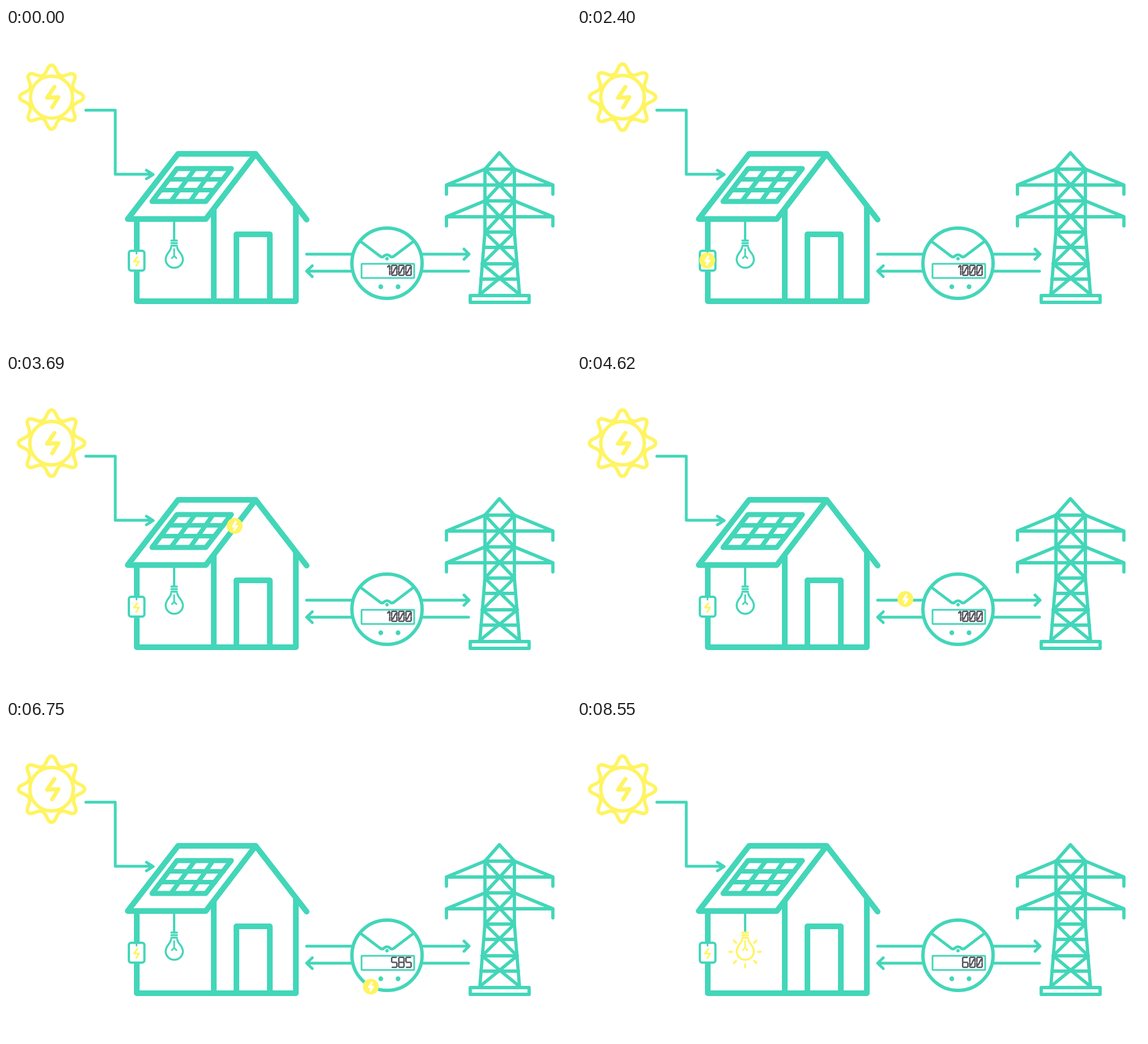
Recreate the animation shown at these times as an HTML page. Size 998 by 561 pixels, loop 9000 ms.

```html
<!DOCTYPE html>
<html lang="en">
<head>
<meta charset="utf-8">
<title>Solar power and net metering</title>
<style>
  html, body { margin: 0; width: 100%; height: 100%; overflow: hidden; background: #fff; }
  svg { display: block; width: 100%; height: 100%; }
  svg { --teal: #43d6b9; --sun: #fff462; }
  g, path, circle, rect { stroke-linecap: round; stroke-linejoin: round; }
  .line { fill: none; stroke: var(--teal); }
  .dot { fill: var(--teal); stroke: none; }
  .yellow { fill: none; stroke: var(--sun); }
  .lit { stroke: var(--sun); }
  .rays { visibility: hidden; }
  .lit .rays { visibility: visible; }
</style>
</head>
<body>
<svg viewBox="0 0 998 561">
  <g class="yellow" transform="translate(80.5 122)">
    <g id="sun" stroke-width="6">
      <circle r="37.5"/>
    </g>
    <path d="M5-18L-8 1L12 0L1 18" stroke-width="7"/>
  </g>

  <g class="line" stroke-width="5">
    <path d="M141 145H193V258H258M248 251L260 258.5L248 266"/>
    <path d="M531 399H816M809 390L818 399L809 408"/>
    <path d="M817 429H533M541 419.500L531 429L541 438.500"/>
  </g>

  <g class="line" stroke-width="10">
    <path d="M304 222H441L353 337H215ZM441 222L531 338"/>
    <path d="M231 338V482H512V316M367 320V482M407 482V364H466V482"/>
  </g>

  <g id="panel" class="line" stroke-width="9">
    <path d="M302 248H398L353 306H258Z"/>
    <path d="M288 267H384M273 286H369M334 248L291 306M366 248L325 306" stroke-width="8"/>
  </g>

  <path class="line" d="M297 342V374" stroke-width="4"/>
  <g id="bulb" class="line" stroke-width="3.500">
    <path d="M292 375H302M292 379.500H302M292 384H302"/>
    <path d="M291.500 387C291 395 282 397 282 409A15.300 15.300 0 0 0 312.500 409C312.500 397 303 395 302.500 387"/>
    <path d="M297 390V402L293 406M297 402L301 406" stroke-width="3"/>
    <path class="rays" d="M320 409H325M274 409H269M297 431V436M313 425L317 429M281 425L277 429M313 393L317 389M281 393L277 389"/>
  </g>

  <g id="battery" class="line" stroke-width="4">
    <rect x="217" y="393" width="27.500" height="35" rx="4" fill="#fff"/>
    <path d="M230.500 394V398" stroke-width="3"/>
    <path class="yellow" d="M232 404L226 412H235L230 420" stroke-width="3"/>
  </g>

  <g class="line" stroke-width="6">
    <circle cx="673" cy="415" r="62" fill="#fff"/>
    <path d="M627 377L660 402Q665 406 668 402Q673 398 678 402Q681 406 686 402L719 377" stroke-width="5"/>
    <rect x="628" y="416" width="93" height="25" rx="1" stroke-width="3"/>
    <circle class="dot" cx="673" cy="407" r="3"/>
    <circle class="dot" cx="662" cy="456.500" r="4.200"/>
    <circle class="dot" cx="692.500" cy="456.500" r="4.200"/>
  </g>
  <path id="digits" fill="none" stroke="#55535c" stroke-width="2.600"/>

  <g id="tower" class="line" stroke-width="5.800">
    <path d="M846 249L871.500 220L898 249"/>
    <path d="M846 249V360L837 470M898 249V360L907 470"/>
    <path d="M846 249H898M846 305H898M846 360H898M844 387H900M841 416H903M839 443H905"/>
    <path d="M846 249L778 277V293M778 277H966M898 249L966 277V293"/>
    <path d="M846 305L778 333V349M778 333H966M898 305L966 333V349"/>
    <path d="M846 249L898 305L846 360L903 416L837 470M898 249L846 305L898 360L841 416L907 470"/>
    <rect x="820" y="472" width="104" height="12"/>
  </g>

  <g id="ball">
    <circle r="14" fill="#fff462"/>
    <path d="M2-7L-3 1L4 0L-1 7" fill="none" stroke="#fff" stroke-width="3.600"/>
  </g>
</svg>
<script>
const LOOP = 9000, STEP = 30;
const $ = id => document.getElementById(id);
const svgPath = d => {
  const path = document.createElementNS('http://www.w3.org/2000/svg', 'path');
  path.setAttribute('d', d);
  return path;
};

for (let i = 0; i < 8; i++) {
  const ray = svgPath('M-15-39C-8-42-8-57 0-57S8-42 15-39');
  ray.setAttribute('transform', `rotate(${i * 45})`);
  $('sun').append(ray);
}

// Each leg: start, end, route of the energy ball.
const legs = [
  [300, 1200, 'M141 144H193V258H256L264 276'],
  [1500, 2100, 'M262 276L215 337H230V410'],
  [2400, 2970, 'M230 410V338H297V375'],
  [3120, 3690, 'M230 410V338H352L404 268'],
  [3690, 4020, 'M404 268L441 222L488 285'],
  [4020, 4620, 'M488 285L512 315V397H580'],
  [4620, 5760, 'M580 397H611A64 64 0 0 1 735 397H871'],
  [5910, 7740, 'M871 429H735A64 64 0 0 1 611 429H512V482H424'],
  [7740, 8550, 'M424 482H367V337H297V373']
].map(([start, end, d]) => {
  const path = svgPath(d);
  return { start, end, path, length: path.getTotalLength() };
});

const highlights = {
  panel: [[1350, 1500]],
  battery: [[2100, 2400]],
  bulb: [[2970, 3120], [8550, LOOP]],
  tower: [[5760, 5910]]
};

// Seven segments, plus a slash (h) for zero and a flag (i) for one.
const segments = {
  a: 'M-3.500-8.700H3.500', b: 'M4.600-7.500V-1.200', c: 'M4.600 1.200V7.500',
  d: 'M-3.500 8.700H3.500', e: 'M-4.600 1.200V7.500', f: 'M-4.600-7.500V-1.200',
  g: 'M-3.300 0H3.300', h: 'M-2.500 5L2.500-5', i: 'M1-6L3.500-8.500'
};
const glyphs = ['abcdefh', 'bci', 'abged', 'abgcd', 'fgbc', 'afgcd', 'afgecd', 'abc', 'abcdefg', 'abcdfg'];

const shift = (d, x, y) => d.replace(/M(-?[\d.]+)(-[\d.]+| [\d.]+)/, (_, a, b) => `m${+a + x} ${+b + y}`)
  .replace('m', 'M')
  .replace(/H(-?[\d.]+)/, (_, a) => `H${+a + x}`)
  .replace(/V(-?[\d.]+)/, (_, b) => `V${+b + y}`)
  .replace(/L(-?[\d.]+)(-[\d.]+| [\d.]+)/, (_, a, b) => `L${+a + x} ${+b + y}`);

const drawNumber = value => [...String(value)].reverse().map((digit, i) =>
  [...glyphs[digit]].map(s => shift(segments[s], 711 - 12.6 * i, 427.5)).join('')).join('');

const progress = (t, start, end) => Math.min(1, Math.max(0, (t - start) / (end - start)));

function draw(t) {
  $('sun').setAttribute('transform', `scale(${t < 150 ? 0.99 : 1.025})`);

  for (const id in highlights)
    $(id).classList.toggle('lit', highlights[id].some(([from, to]) => t >= from && t < to));

  const leg = legs.find(l => t >= l.start && t < l.end) || (t >= 1200 && t < 1350 && legs[0]);
  $('ball').style.display = leg ? '' : 'none';
  if (leg) {
    const p = leg.path.getPointAtLength(leg.length * progress(t, leg.start, leg.end));
    $('ball').setAttribute('transform', `translate(${p.x} ${p.y})`);
  }

  const reading = 1000 - 500 * progress(t, 4680, 5280) + 100 * progress(t, 6240, 6840);
  $('digits').setAttribute('d', drawNumber(Math.round(reading)));
}

function tick() {
  const t = performance.now() % LOOP;
  draw(Math.floor(t / STEP) * STEP);
  requestAnimationFrame(tick);
}
tick();
</script>
</body>
</html>
```
